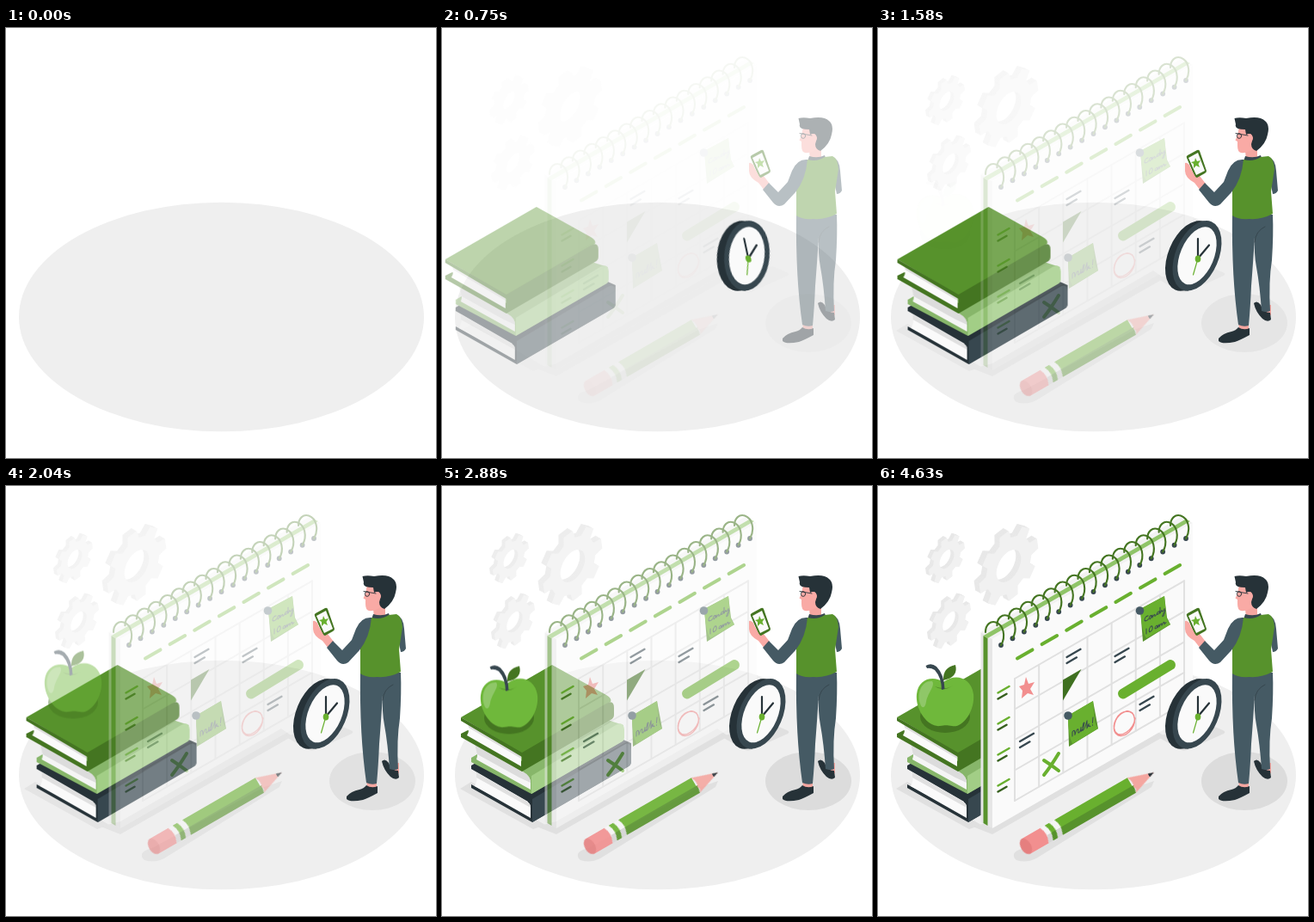
An HTML page that plays this animation: 500x500 px, repeating every 4710 ms.

```html
<!DOCTYPE html>
<html lang="en">
<head>
<meta charset="utf-8">
<title>Planner</title>
<style>
html, body { margin: 0; width: 100%; height: 100%; overflow: hidden; background: #fff; }
svg { display: block; width: 100vw; height: 100vh; }

.scene, .in { animation: 4.71s linear infinite; }
.scene { animation-name: show; animation-timing-function: step-end; }
.clock { animation-name: speed; transform-origin: 366px 265px; }
.clock, .books, .man, .apple { animation-timing-function: cubic-bezier(.36, -.01, .5, 1.38); }
.books { animation-name: left; }
.man { animation-name: man; }
.apple { animation-name: down; }
.shade { animation-name: shade; }
.gears { animation-name: gears; }
.pencil { animation-name: pencil; animation-timing-function: ease-in-out; }
.calendar { animation-name: calendar; animation-timing-function: cubic-bezier(.4, .2, .7, .75); }

@keyframes show { 0% { visibility: hidden; } 5.3%, 100% { visibility: visible; } }
@keyframes speed {
  0% { opacity: 0; transform: translateX(250px) skewX(-20deg); }
  19.11% { opacity: 1; transform: translateX(0) skewX(10deg); }
  25.48% { opacity: 1; transform: translateX(0) skewX(-2deg); }
  31.85%, 100% { opacity: 1; transform: translateX(0) skewX(0deg); }
}
@keyframes left {
  0% { opacity: 0; transform: translateX(-30px); }
  47.77%, 100% { opacity: 1; transform: none; }
}
@keyframes man { 0% { opacity: 0; } 48.8%, 100% { opacity: 1; } }
@keyframes down {
  0%, 31.85% { opacity: 0; transform: translateY(-30px); }
  63.69%, 100% { opacity: 1; transform: none; }
}
@keyframes shade { 0%, 8% { opacity: 0; } 58%, 100% { opacity: 1; } }
@keyframes gears { 0%, 11% { opacity: 0; } 78%, 100% { opacity: 1; } }
@keyframes pencil { 0% { opacity: 0; } 78%, 100% { opacity: 1; } }
@keyframes calendar { 0%, 8.5% { opacity: 0; } 98.3%, 100% { opacity: 1; } }

.ln { fill: none; stroke-linecap: round; stroke-linejoin: round; }
</style>
</head>
<body>
<svg viewBox="0 0 500 500">
<ellipse cx="250.5" cy="336" rx="235.5" ry="133.3" fill="#efefef"/>
<g class="scene">

<g class="in shade" fill="#e0e0e0">
  <ellipse cx="426" cy="343" rx="50" ry="34" fill="#dcdcdc"/>
  <path d="M21 352L34 344 120 394 106 399Z"/>
  <path d="M110 396L133 405 333 291 320 282 133 390Z"/>
  <path d="M324 291L352 307Q357 309 362 306L402 288Q405 286 401 284L385 277Z"/>
  <path d="M158 428Q159 424 170 421L300 350 321 343 318 350 184 433Q172 439 161 435 157 432 158 428Z"/>
</g>

<g class="in gears" id="gears"></g>

<g class="in books">
  <path fill="#263238" d="M34 325L140 264 220 299 220 320Q220 324 217 326L105 391 34 351V347L100 382V367L34 329Z"/>
  <path fill="#37474f" d="M105 364L211 301Q219 297 220 306V320Q220 324 217 326L105 391Z"/>
  <path fill="#fafafa" d="M40 333L99 367Q103 369 103 374V386L38 349Q42 342 40 333Z"/>
  <path fill="#e0e0e0" d="M40 333L99 367Q103 369 103 374L40 339Z"/>
  <path fill="#87b66a" d="M34 316L140 255 211 278V296L104 358 34 321Z"/>
  <path fill="#f5f5f5" d="M38 302L96 334Q103 338 103 345V353L40 318Q43 310 38 302Z"/>
  <path fill="#dcdcdc" d="M38 300L94 332Q103 337 103 345L90 339 41 312Z"/>
  <path fill="#a2ce86" d="M104 337L202 278Q211 273 212 283V292Q212 296 208 298L104 358Z"/>
  <path fill="#447521" d="M22 288L30 284 93 320 93 332 22 292Z"/>
  <path fill="#fafafa" d="M30 276L87 309Q92 311 92 317V326L29 290Q33 283 30 276Z"/>
  <path fill="#dedede" d="M30 276L87 309Q92 311 92 317L31 281Z"/>
  <path fill="#57922c" d="M22 269L128 208 191 243Q198 247 196 251L93 311Z"/>
  <path fill="#447521" d="M22 269L93 310 191 253Q200 248 200 258V266Q200 270 196 272L93 332V315L22 273Z"/>
</g>

<g class="in apple">
  <ellipse cx="78" cy="268" rx="29" ry="19" fill="#447521"/>
  <path fill="#6fb83b" d="M76 228C88 218 108 221 111 242 113 262 98 282 86 279 80 278 78 278 72 279 58 281 43 260 45 242 47 224 64 220 76 228Z"/>
  <path fill="#8fc768" d="M63 227C51 226 45 240 49 253 51 260 55 258 56 251 58 240 67 232 63 227Z"/>
  <path fill="#4f8728" d="M66 233Q76 240 87 232 80 236 76 235 71 235 66 233Z"/>
  <path fill="#37474f" d="M55.500 209Q62 205 68 210 77 219 77.500 236L74 237Q74 223 66 214 61 211 57 212Z"/>
  <path fill="#447521" d="M76 226Q75 211 90 208 94 222 76 226Z"/>
</g>

<g class="in calendar">
  <path fill="#e6e6e6" d="M119.500 170L133 178V398L119.500 391Z"/>
  <path fill="#f2f2f2" d="M119.500 170L352 36 366 43 133 178Z"/>
  <path fill="#57922c" d="M122.500 174L127.500 177V395L122.500 392Z"/>
  <path fill="#8fc468" d="M122.500 174L127.500 177 363 41 358 38.500Z"/>
  <path fill="#fafafa" d="M133 178L366 43V264L133 398Z"/>
  <g id="grid" class="ln" stroke="#e0e0e0" stroke-width="2"></g>
  <g id="dashes" class="ln" stroke="#69b02f" stroke-width="4"></g>
  <g id="labels" class="ln" stroke-width="2.500"></g>
  <g id="lines" class="ln" stroke="#37474f" stroke-width="2.300"></g>
  <path fill="#f28f8f" d="M172 222L175 230 182 228 177 236 181 243 174 241 167 247 168 238 164 233 170 231Z"/>
  <path fill="#3f7020" d="M215 225.500L236.500 213 215 249.500Z"/>
  <g class="ln">
    <path stroke="#69b02f" stroke-width="4" d="M193 336Q201 326 210 311M193 319Q201 324 210 331"/>
    <path stroke="#69b02f" stroke-width="12" d="M285 241.500L340 208"/>
    <path stroke="#f28f8f" stroke-width="1.400" d="M296 264C288 258 277 267 275 277 272 291 283 294 292 286 301 277 301 262 289 262 279 263 271 277 276 286 282 294 297 284 299 270"/>
  </g>
  <path fill="#57922c" d="M305 143L333 128 336 153 340 161 308 181Z"/>
  <path fill="#69b02f" d="M305 143L333 128 335 151Q336 157 340 161L312 177Q307 171 305 143Z"/>
  <path fill="#57922c" d="M221 267L250 250 256 282 222 303Z"/>
  <path fill="#69b02f" d="M221 267L250 250 252 273Q253 279 256 282L226 300Q221 290 221 267Z"/>
  <g class="ln" stroke="#37474f" stroke-width="1">
    <path transform="matrix(1 -.54 0 1 310 158)" d="M4-5Q0-6 0-2 1 1 5-1 6-5 8-3 7 1 6 0 8-1 9-3V0Q12-5 12 0 14 0 15-3 18-4 17-1 14 1 15-3M18-7V0L20-3Q20 0 22-1L23-3Q24 5 21 5 20 3 24 0"/>
    <path transform="matrix(1 -.54 0 1 312 172)" d="M0-6V0M5-6Q2-3 4 0 8 0 7-4 7-6 5-6M13-3Q10-4 10-1 12 1 13-3V0L15-3V0Q17-4 18-2V0Q20-4 21-2V0L23-1"/>
    <path transform="matrix(1 -.54 0 1 226 291)" d="M0 0V-5Q3-8 3 0 5-7 7-4 6 0 8 0 10-1 10-5L10 0Q13-2 14-8 12-11 12 0 15-1 17-9V0Q21-6 18-3L21 0M24-9L23.500-3M23.500-.5V0"/>
  </g>
  <g fill="#455a64"><circle cx="304.500" cy="145" r="4.800"/><circle cx="221" cy="267" r="4.800"/></g>
  <g id="rings"></g>
</g>

<g class="in clock">
  <g transform="translate(362.500 265) rotate(23)"><ellipse rx="25" ry="43" fill="#263238"/></g>
  <path fill="#263238" d="M370 224.500L380 224.500 361 305.500 351 305Z"/>
  <g transform="translate(371 264.800) rotate(23)">
    <ellipse rx="25" ry="43" fill="#37474f"/>
    <ellipse rx="19.500" ry="35.500" fill="#fafafa"/>
  </g>
  <g class="ln">
    <path stroke="#263238" stroke-width="2.200" d="M372 268V245M372 268L385 252.500"/>
    <path stroke="#69b02f" stroke-width="1.200" d="M372 268L366.500 287"/>
  </g>
  <ellipse cx="372" cy="268.500" rx="3.300" ry="4" fill="#69b02f"/>
</g>

<g class="in pencil" transform="translate(172 419) rotate(-30)">
  <path fill="#f28f8f" d="M0-10H29V10H0Z"/>
  <ellipse rx="6" ry="10" fill="#e57f7f"/>
  <path fill="#f5f5f5" d="M25-10H44Q49 0 44 10H25Q30 0 25-10Z"/>
  <path fill="#d6d6d6" d="M28 1H46.500L44 10H25Z"/>
  <path fill="#69b02f" d="M31-10H37Q42 0 37 10H31Q36 0 31-10ZM44-10H142V10H44Q49 0 44-10Z"/>
  <path fill="#57922c" d="M34 1H39.500L37 10H31ZM46.500 1H144L142 10H44Z"/>
  <path fill="#f4a6a0" d="M142-10L172 0 142 10Q146 6 143 3 146-2 142-10Z"/>
  <path fill="#263238" d="M165-2.300L172 0 165 2.300Z"/>
</g>

<g class="in man">
  <path fill="#455a64" d="M454 150Q462 152 463 166L465 189Q463 193 459 193L456 178Z"/>
  <path fill="#f4a6a0" d="M447 322H457V334H449ZM419 340H431V352H420Z"/>
  <path fill="#263238" d="M437 320Q441 316 445 322 448 331 456 331L457 339Q453 343 447 338 439 330 437 320ZM396 361Q401 355 411 353 416 352 419 348 425 352 432 349V357Q421 363 415 365 400 368 396 364Z"/>
  <path fill="#455a64" d="M412 217H459Q460 240 458 270 454 295 456 329 452 331 446 329 444 300 440 278 437 262 438 243 436 275 434 300 433 325 431 346 425 348 419 345 411 290 412 217Z"/>
  <path class="ln" stroke="#37474f" d="M438 249Q439 236 450 231"/>
  <path fill="#f4a6a0" d="M426 135H441V153Q433 157 428 152Z"/>
  <path fill="#f9aaa5" d="M420 113L437 120 438 139Q430 146 422 145 418 144 418 137L418 132 415.500 130.500Q419 124 420 113Z"/>
  <path fill="#263238" d="M414.500 105Q420 103.500 428 105 444 102 450 108 456 113 453 124 451 135 440 143 434 141 434 135L436 128Q434 121 428 124L427 118Q414 118 416 112Z"/>
  <ellipse cx="432" cy="128" rx="3.700" ry="5" fill="#f9aaa5"/>
  <g class="ln" stroke="#263238" stroke-width=".9"><path d="M416 122.500L430 125"/><ellipse cx="420" cy="125.500" rx="2.600" ry="2.900"/></g>
  <path fill="#37474f" d="M427 149Q437 152 445 148L447 154Q435 160 425 155Z"/>
  <path fill="#57922c" d="M425 153Q436 156 445 150L454 149Q460 151 461 164L457 190 459 216Q446 223 432 222 418 223 412 218V180Q411 157 425 153Z"/>
  <path fill="#f9aaa5" d="M357 157Q360 156 362 161L366 169 371 174Q368 165 371 161L374 172 381 181 375 189 368 180Q357 174 357 166Z"/>
  <path fill="#455a64" d="M425 153Q413 152 407 166L402 179 391 191 380 180 373 188 385 203Q391 210 398 205L411 191Q423 176 425 153Z"/>
  <path fill="#447521" d="M359 151Q358 149 360 148L371 142Q373 141 374 143L382 166Q382 168 380 169L371 174Q369 174 368 172Z"/>
  <path fill="#fafafa" d="M361 151L372 145 380 166 370 171Z"/>
  <path fill="#69b02f" d="M369 151L371 155 375 154 372.500 158 374 162 370 160 367 163 367 158 364 156 368 155Z"/>
  <path fill="#f9aaa5" d="M358 158Q362 157 363 162L368 171Q371 175 370 178L361 174Q356 168 358 158Z"/>
</g>

</g>
</svg>
<script>
const NS = 'http://www.w3.org/2000/svg';
const SLOPE = .577;

function add(id, tag, attrs) {
  const el = document.createElementNS(NS, tag);
  for (const key in attrs) el.setAttribute(key, attrs[key]);
  document.getElementById(id).append(el);
}

// Line that follows the slant of the calendar page.
function slant(id, x, y, w, attrs = {}) {
  add(id, 'path', { d: `M${x} ${y}l${w} ${-w * SLOPE}`, ...attrs });
}

function gear(cx, cy, r, hole, depth) {
  const n = 8, pts = [];
  const at = (rad, a) => {
    const x = rad * Math.cos(a), y = rad * Math.sin(a);
    return `${(x * .84).toFixed(1)} ${(y - x * .5).toFixed(1)}`;
  };
  for (let i = 0; i < n; i++) {
    [[-.32, .77], [-.2, 1], [.2, 1], [.32, .77]].forEach(([off, k]) =>
      pts.push(at(r * k, (i + .8 + off) * 2 * Math.PI / n)));
  }
  const ring = [];
  for (let i = 0; i < 40; i++) ring.push(at(hole, i * Math.PI / 20));
  const d = `M${pts.join('L')}ZM${ring.join('L')}Z`;
  const layers = 6;
  for (let i = layers; i >= 0; i--) {
    const s = depth * i / layers;
    add('gears', 'path', {
      d, 'fill-rule': 'evenodd', fill: i ? '#e8e8e8' : '#f1f1f1',
      transform: `translate(${cx - s} ${cy - s * .55})`
    });
  }
}

gear(152, 93, 41, 17, 6);
gear(80, 85, 25, 10, 4);
gear(84.500, 158, 28, 11, 4);

for (let i = 0; i < 8; i++) {
  const x = 159 + i * 28.15;
  add('grid', 'path', { d: `M${x} ${224 - i * 28.15 * SLOPE}v142` });
}
for (let i = 0; i < 5; i++) slant('grid', 159, 224 + i * 35.5, 197);
for (let i = 0; i < 7; i++) slant('dashes', 162 + i * 28.6, 200.5 - i * 16.4, 17.5);
for (let i = 0; i < 4; i++) {
  slant('labels', 139.5, 240.5 + i * 36, 13, { stroke: '#69b02f' });
  slant('labels', 139.5, 247.5 + i * 36, 10, { stroke: '#37601f' });
}
[[219.5, 199], [275.5, 198], [165, 297], [304.5, 254]].forEach(([x, y]) => {
  slant('lines', x, y, 16);
  slant('lines', x, y + 7, 11.5);
});
for (let i = 0; i < 17; i++) {
  const pos = { transform: `translate(${143 + i * 13.44} ${185 - i * 7.75})` };
  add('rings', 'circle', { r: 2.9, fill: '#37474f', ...pos });
  add('rings', 'path', {
    class: 'ln', stroke: '#447521', 'stroke-width': 2.1,
    d: 'M-18 -15C-18 -24 -12 -28.500 -6 -26.500C3 -23.500 6 -10 0 0', ...pos
  });
}
</script>
</body>
</html>
```
